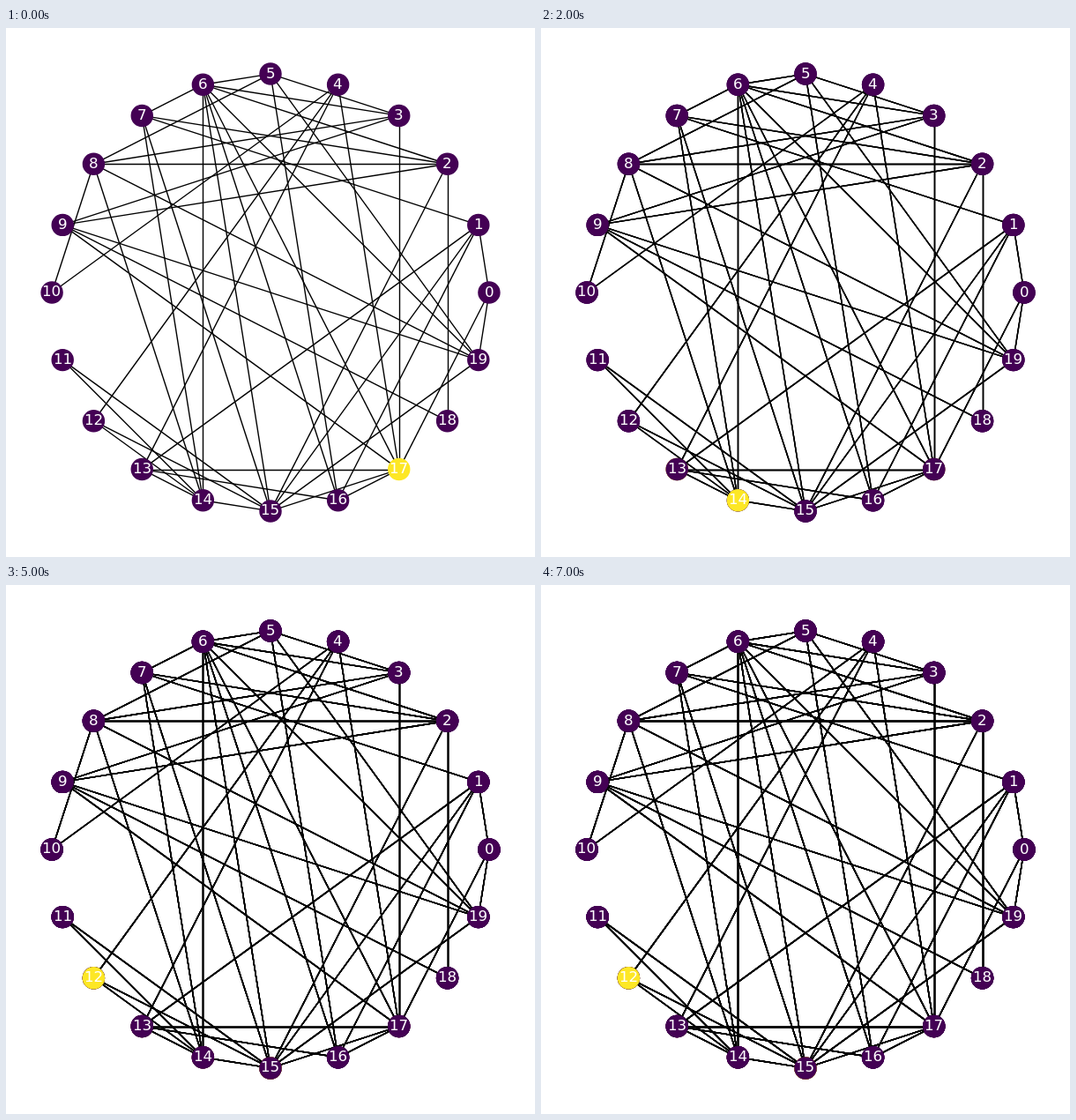
These frames come from a looping animation (600 by 600 pixels, 8 s). An HTML page with a canvas:

```html
<!DOCTYPE html>
<html lang="en">
<head>
<meta charset="utf-8">
<title>Random walk on a graph</title>
<style>
html, body { margin: 0; width: 100%; height: 100%; overflow: hidden; background: #fff; }
canvas { display: block; }
</style>
</head>
<body>
<canvas id="stage" width="600" height="600"></canvas>
<script>
const ctx = document.getElementById('stage').getContext('2d');
const STEP = 1000;
const WALK = [17, 13, 14, 12, 15, 12, 15, 12];
const PX = 100 / 72; // one point in pixels
const RING = 300 / 1.21;
const NODE_R = Math.sqrt(300) / 2 * PX;

// Neighbours with a higher number, one entry per node
const LINKS = [
  '1 17 19', '7 13 15 16', '6 7 8 9 15 18', '5 6 8 9 17', '10 12 13 17',
  '6 8 16 19', '7 14 15 16 17 19', '14 15', '10 14 19', '17 18 19',
  '', '14 15', '14 15', '14 16 17', '15', '17 19', '17'
];

const nodes = Array.from({ length: 20 }, (_, i) => {
  const a = i * Math.PI / 10;
  return { x: 300 + RING * Math.cos(a), y: 300 - RING * Math.sin(a) };
});
const edges = LINKS.flatMap((list, i) =>
  list.split(' ').filter(Boolean).map(j => [nodes[i], nodes[+j]]));

const snap = v => Math.floor(v + 0.5) + 0.5;
const same = (a, b) => Math.abs(a - b) < 1e-6;

function drawEdge([a, b]) {
  // Upright and level lines sit on the pixel grid
  const fix = same(a.x, b.x) || same(a.y, b.y) ? snap : v => v;
  ctx.beginPath();
  ctx.moveTo(fix(a.x), fix(a.y));
  ctx.lineTo(fix(b.x), fix(b.y));
  ctx.stroke();
}

function drawNode({ x, y }, color) {
  ctx.fillStyle = ctx.strokeStyle = color;
  ctx.beginPath();
  ctx.arc(x, y, NODE_R, 0, 2 * Math.PI);
  ctx.fill();
  ctx.stroke();
}

function drawLabel({ x, y }, text) {
  const w = ctx.measureText(text).width;
  ctx.fillText(text, Math.round(x - w / 2), Math.round(y + 4.5));
}

function drawGraph(active) {
  ctx.lineWidth = PX;
  ctx.strokeStyle = '#000';
  edges.forEach(drawEdge);
  nodes.forEach((n, i) => drawNode(n, i === active ? '#fde725' : '#440154'));
  ctx.fillStyle = '#fff';
  ctx.font = `${12 * PX}px "DejaVu Sans", sans-serif`;
  nodes.forEach((n, i) => drawLabel(n, String(i)));
}

// Each step is painted over the earlier ones, so soft edges grow heavier
function render(step) {
  ctx.fillStyle = '#fff';
  ctx.fillRect(0, 0, 600, 600);
  WALK.slice(0, step + 1).forEach(drawGraph);
}

let shown = -1;
const start = performance.now();
function tick() {
  const step = Math.floor((performance.now() - start) / STEP) % WALK.length;
  if (step !== shown) render(shown = step);
  requestAnimationFrame(tick);
}
tick();
</script>
</body>
</html>
```
